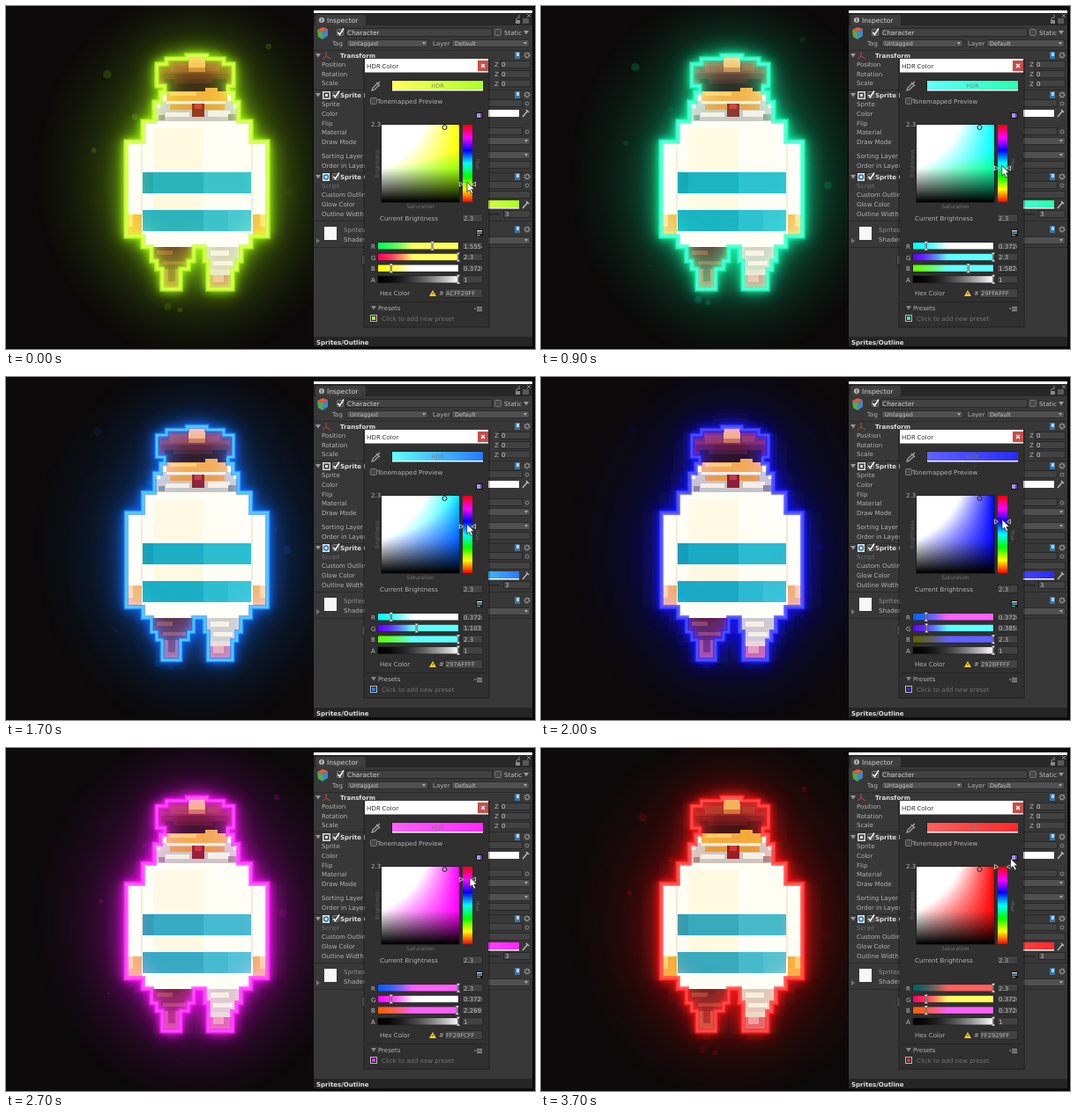
Write an HTML page with a canvas that moves like this. It is 600 px wide and 390 px high and loops after 3800 ms.

```html
<!DOCTYPE html>
<html lang="en">
<head>
<meta charset="utf-8">
<title>HDR outline color</title>
<style>
html, body { margin: 0; width: 100%; height: 100%; overflow: hidden; background: #0c0a0a; }
svg, canvas { position: absolute; display: block; }
svg { left: 0; top: 0; }
canvas { left: 426px; top: 135px; }
text { font-family: "DejaVu Sans", Verdana, sans-serif; white-space: pre; }
.title { font-family: "Open Sans", "Noto Sans", sans-serif; }
.glow { fill: var(--glow); }
.add { mix-blend-mode: screen; }
</style>
</head>
<body>
<svg id="stage" width="600" height="390" viewBox="0 0 600 390"></svg>
<canvas id="field" width="88" height="88"></canvas>
<script>
const LOOP = 3800, STEP = 100, MAX = 2.3, LOW = 0.162;
const stage = document.getElementById('stage');
const field = document.getElementById('field').getContext('2d');

// time, hue, pointer x, pointer y
const keys = [
  [0, 83.18, 523, 200], [500, 127.86, 523, 189], [1300, 187.46, 522.5, 174],
  [2000, 239.59, 523, 162], [2400, 274.33, 524.5, 153], [3100, 336.44, 528, 138.5],
  [3350, 360, 530, 133], [3700, 360, 532.5, 125.5]
];

const clamp = (v, a = 0, b = 1) => Math.min(b, Math.max(a, v));
const mix = (a, b, k) => a + (b - a) * k;
const mixRgb = (a, b, k) => a.map((v, i) => mix(v, b[i], k));
const css = c => `rgb(${c.map(v => Math.round(clamp(v) * 255)).join(', ')})`;
const pureHue = h => [0, 4, 2].map(o => clamp(Math.abs((h / 60 + o) % 6 - 3) - 1));
const range = (n, f) => Array.from({ length: n }, (_, i) => f(i));

// Markup helpers
const rect = (x, y, w, h, fill, extra = '') =>
  `<rect x="${x}" y="${y}" width="${w}" height="${h}" fill="${fill}" ${extra}/>`;
const path = (d, fill, extra = '') => `<path d="${d}" fill="${fill}" ${extra}/>`;
const text = (x, y, s, fill = '#b4b4b4', size = 7, extra = '') =>
  `<text x="${x}" y="${y}" fill="${fill}" font-size="${size}" ${extra}>${s}</text>`;
const bold = (x, y, s, fill = '#dedede') => text(x, y, s, fill, 7, 'font-weight="bold"');
const box = (x, y, w, h, fill = '#424242') =>
  rect(x + .5, y + .5, w - 1, h - 1, fill, 'stroke="#272727"');
const check = (x, y, on) => rect(x + .5, y + .5, 7, 7, '#474747', 'stroke="#777" rx="1"') +
  (on ? path(`M${x + 1.5} ${y + 4} l2 2.5 l4.5 -7`, 'none', 'stroke="#fff" stroke-width="1.4"') : '');
const down = (x, y, fill = '#999') => path(`M${x - 3} ${y - 2} h6 l-3 4.5 z`, fill);
const select = (x, y, w, s = '') =>
  rect(x + .5, y + .5, w - 1, 8, '#505050', 'stroke="#2b2b2b" rx="1.5"') +
  text(x + 4, y + 7, s, '#c4c4c4', 6.5) + path(`M${x + w - 7} ${y + 3} h4 l-2 3 z`, '#aaa');
const dot = (x, y) => `<circle cx="${x}" cy="${y}" r="2" fill="none" stroke="#888"/>`;
const dropper = (x, y) => path(`M${x - 3} ${y + 4} l5 -6 M${x + 1} ${y - 4} l3 3`, 'none',
  'stroke="#b5b5b5" stroke-width="1.5"');
const tools = y => rect(577, y - 4, 6, 8, '#3978a8') + rect(579, y - 3, 3, 4, '#b7d4e6') +
  `<circle cx="591" cy="${y}" r="2.5" fill="none" stroke="#999" stroke-width="2" stroke-dasharray="1.5 .6"/>`;
const rule = y => rect(349, y, 248, 1, '#2a2a2a');
const spread = (id, n) => `<linearGradient id="${id}">` +
  range(n, i => `<stop offset="${i / (n - 1)}"/>`).join('') + '</linearGradient>';

// Silhouette as steps: top, left, right
const torso = [[56, 205, 228], [60, 182, 247], [66, 171, 258], [91, 180, 252], [98, 175, 258],
  [109, 168, 264], [131, 155, 278], [154, 136, 297], [262, 155, 278]];
const leftLeg = [[274, 165, 213], [290, 171, 207], [299, 177, 198]];
const rightLeg = [[274, 225, 267], [290, 229, 262], [300, 229, 257]];
const side = (rows, col, end) => rows.flatMap((r, i) =>
  [[r[col], r[0]], [r[col], i + 1 < rows.length ? rows[i + 1][0] : end]]);
const loop = (rows, end, inner = []) =>
  [...side(rows, 2, end), ...inner, ...side(rows, 1, end).reverse()];
const outline = loop(torso, 274, [...loop(rightLeg, 322), ...loop(leftLeg, 322)]);
const body = 'M' + outline.map(p => p.join(' ')).join(' L ') + ' Z';

const block = (fill, ...boxes) => boxes.map(b => rect(...b, fill)).join('');

function head() {
  return block('#5d1b1b', [182, 60, 65, 38], [171, 66, 87, 25]) +
    block('#7c2620', [184, 64, 62, 8], [175, 72, 79, 5]) +
    block('#923426', [186, 66, 20, 9], [228, 67, 14, 7]) +
    block('#2b1213', [180, 83, 70, 15]) + block('#49191b', [190, 83, 44, 5]) +
    block('#f3ad57', [207, 58, 19, 17]) + block('#c77031', [207, 70, 19, 5]) +
    block('#f3a93a', [182, 97, 69, 11], [226, 93, 14, 6]) + block('#ffcb62', [186, 98, 30, 4]) +
    block('#c6c3bd', [175, 108, 83, 8], [168, 116, 96, 15]) +
    block('#f4eee3', [182, 108, 67, 3], [181, 121, 27, 5], [229, 119, 25, 7]) +
    block('#eb982e', [186, 112, 62, 6]) + block('#8b807c', [173, 124, 7, 6], [252, 123, 9, 7]) +
    block('#8c1c20', [211, 111, 14, 15]) + block('#c9332a', [214, 111, 8, 6]);
}

function shirt() {
  const stripe = y => block('#19a9bb', [155, y, 69, 24]) + block('#2ab9ca', [224, y, 54, 24]);
  return block('#fff9df', [167, 139, 57, 47], [167, 213, 57, 19]) +
    block('#f1e9d5', [153, 157, 2, 83], [278, 157, 2, 83]) + stripe(189) + stripe(232) +
    block('#159caf', [155, 189, 12, 24]) + block('#38c2d0', [252, 232, 26, 24]) +
    block('#f2ad3b', [138, 237, 16, 23], [280, 237, 15, 23]) +
    block('#ffd06d', [138, 237, 6, 14], [288, 237, 7, 14]);
}

function legs() {
  return block('#5c211f', [165, 274, 48, 16], [171, 290, 36, 9]) +
    block('#8c402f', [171, 278, 18, 5], [178, 290, 26, 4]) +
    block('#a14938', [178, 299, 19, 22]) + block('#6a2825', [184, 299, 8, 14]) +
    block('#cfc7b8', [225, 274, 42, 16], [229, 290, 33, 10]) +
    block('#f6eedb', [232, 278, 21, 6], [235, 290, 22, 5]) +
    block('#e5d5c4', [230, 300, 27, 21]) + block('#c4646a', [231, 306, 25, 15]) +
    block('#e49a94', [235, 306, 12, 8]);
}

const blur = (id, s) => `<filter id="${id}" filterUnits="userSpaceOnUse" x="0" y="0" width="349" height="388">
  <feGaussianBlur stdDeviation="${s}"/></filter>`;

function scene() {
  const shape = extra => `<path d="${body}" ${extra}/>`;
  const line = (color, width, extra = '') =>
    shape(`fill="none" stroke="var(--${color})" stroke-width="${width}" ${extra}`);
  return `<defs>${blur('near', 4)}${blur('mid', 11)}${blur('far', 32)}${blur('rim', 3)}
    <clipPath id="view"><rect width="348" height="388"/></clipPath>
    <clipPath id="inside">${shape('')}</clipPath>
    <radialGradient id="haze"><stop offset="0" stop-color="var(--glow)" stop-opacity=".25"/>
      <stop offset=".6" stop-color="var(--glow)" stop-opacity=".1"/>
      <stop offset="1" stop-color="var(--glow)" stop-opacity="0"/></radialGradient></defs>
  ${rect(0, 0, 600, 390, '#0c0a0a')}
  <g clip-path="url(#view)">
    <ellipse cx="216" cy="192" rx="185" ry="215" fill="url(#haze)"/>
    <g id="sparks"></g>
    ${shape('class="glow" filter="url(#far)" opacity=".5"')}
    ${shape('class="glow" filter="url(#mid)" opacity=".65" stroke="var(--glow)" stroke-width="6"')}
    ${shape('class="glow" filter="url(#near)" opacity=".9" stroke="var(--glow)" stroke-width="5"')}
    ${shape('fill="#fffef4"')}${head()}${shirt()}${legs()}
    <g class="add" clip-path="url(#inside)">
      ${shape('class="glow" opacity=".13"')}
      ${line('glow', 15, 'filter="url(#mid)" opacity=".6"')}
      ${line('glow', 6, 'filter="url(#rim)" opacity=".7"')}
    </g>
    ${line('glow', 6, 'opacity=".55"')}
    ${line('hot', 3)}
  </g>`;
}

function inspector() {
  const labels = [['Position', 69], ['Rotation', 79.5], ['Scale', 90], ['Sprite', 114], ['Color', 125],
    ['Flip', 135.5], ['Material', 146], ['Draw Mode', 157], ['Sorting Layer', 173], ['Order in Layer', 184],
    ['Custom Outline', 217], ['Glow Color', 228], ['Outline Width', 239]];
  return rect(349, 5, 248, 3.5, '#fff') + rect(349, 8, 248, 379, '#383838') +
    rect(349, 8, 248, 14, '#282828') + rect(351, 10, 57, 12, '#3d3d3d', 'rx="2"') +
    '<circle cx="358" cy="16" r="3" fill="#bbb"/>' + rect(357.5, 14, 1, 4, '#333') +
    text(364, 19, 'Inspector', '#d5d5d5', 7.6) +
    rect(578, 16, 5, 4, '#888') + path('M579 16 v-2 q1.5 -2 3 0', 'none', 'stroke="#888"') +
    path('M586 15 h7 M586 17 h7 M586 19 h7', 'none', 'stroke="#888"') +
    path('M582 10 v4 M591 9 l4 4 M595 9 l-4 4', 'none', 'stroke="#888"') +
    path('M353 27 l6 -3 l6 2 l-6 4 z', '#e05a3a') + path('M353 27 l6 3 v8 l-5 -3 z', '#4fae48') +
    path('M359 30 l6 -4 v8 l-6 4 z', '#3f89c8') +
    check(375, 26, true) + box(385, 25, 167, 10) + text(387, 32.5, 'Character', '#ccc', 7.4) +
    check(554, 26, false) + text(565, 33, 'Static', '#c4c4c4') + down(590, 30) +
    text(370, 45, 'Tag') + select(386, 38, 93, 'Untagged') + text(484, 45, 'Layer') + select(505, 38, 89, 'Default') +
    rule(50) + rule(95) + rule(189) + rule(244) +
    [56, 101, 194].map(y => down(354, y) + tools(y)).join('') + tools(254) +
    path('M363 52 v5 l5 3 M363 57 l-4 3', 'none', 'stroke="#b84a3b"') + bold(379, 59, 'Transform') +
    rect(359, 97, 9, 9, '#d9d9d9') + rect(360.5, 98.5, 6, 6, '#3b3b3b') + rect(362, 100, 3, 3, '#ddd') +
    check(370, 97, true) + bold(379, 104, 'Sprite Renderer') +
    rect(359, 190, 8, 9, '#d7e5ed') +
    '<circle cx="363" cy="194.5" r="2.5" fill="none" stroke="#2f75a8" stroke-width="1.5"/>' +
    check(370, 190, true) + bold(379, 197, 'Sprite Outline') +
    labels.map(([s, y]) => text(358, y, s)).join('') + text(358, 207, 'Script', '#707070') +
    [62, 73, 83.5].map(y => box(560, y, 35, 9) + text(554, y + 7, 'Z') + text(562, y + 7, '0', '#ccc')).join('') +
    [106, 138, 199].map(y => box(500, y, 86, 9) + dot(591, y + 5)).join('') +
    [149, 165].map(y => select(500, y, 95)).join('') + box(500, 176, 95, 9) + box(500, 210, 95, 9) +
    rect(500, 118, 82, 8, '#fff') + dropper(589, 122) +
    rect(500, 221, 82, 8, 'url(#swatch)') + rect(500, 229, 82, 1.5, '#fff') + dropper(589, 226) +
    rect(500, 236, 60, 1.5, '#262626') + box(564, 232, 31, 9) + text(566, 239, '3', '#ccc') +
    rect(361, 251, 14, 15, '#f7f7f7') + text(383, 257, 'Sprites/Outline', '#929292') + text(383, 268, 'Shader') +
    path('M352 264 v6 l4 -3 z', '#777') + select(500, 262, 95) + rule(274) +
    rect(403.5, 282.5, 139, 12, '#505050', 'stroke="#292929" rx="2"') +
    rect(349, 376, 248, 11, '#252525') + bold(352, 385, 'Sprites/Outline');
}

function sliders() {
  return ['R', 'G', 'B', 'A'].map((s, i) => {
    const y = 269 + i * 12.7;
    return text(414, y + 6.8, s, '#c0c0c0') + rect(421.5, y - .5, 92, 8.5, '#1c1c1c') +
      rect(422, y, 91, 7.5, `url(#bar${s})`) + box(517, y - 1, 24, 9.5) +
      `<g clip-path="url(#cells)">${text(519, y + 6.5, i > 2 ? '1' : '', '#c0c0c0', 7, `id="val${s}"`)}</g>` +
      path('M-2.5 -1.5 h5 L.6 1 v5.5 L2.5 9 h-5 L-.6 6.5 V1 z', '#eee',
        `id="knob${s}" stroke="#222" stroke-width=".6" transform="translate(513 ${y})"`);
  }).join('');
}

function popup() {
  const hues = range(7, i => `<stop offset="${i / 6}" stop-color="${css(pureHue(360 - i * 60))}"/>`).join('');
  return `<defs><linearGradient id="hues" x2="0" y2="1">${hues}</linearGradient>${spread('swatch', 2)}
    ${['R', 'G', 'B', 'A'].map(s => spread('bar' + s, 8)).join('')}
    <clipPath id="cells"><rect x="517" y="260" width="23" height="60"/></clipPath></defs>` +
    rect(405, 60, 144, 306, '#000', 'opacity=".25"') + rect(407, 60, 140, 304, '#303030') + rect(407, 60, 140, 15.5, '#fff') +
    text(409, 70.5, 'HDR Color', '#222', 7.5, 'class="title"') + rect(535, 62, 12, 12, '#c64e4b') +
    path('M539 66 l4 4 M543 66 l-4 4', 'none', 'stroke="#fff" stroke-width="1.2"') +
    path('M415 96 l1 -3 l5 -5 l2 2 l-5 5 z M420 87 l4 4 M422 88 l2 -2', 'none', 'stroke="#aaa" stroke-width="1.2"') +
    rect(437, 84, 104, 13, '#202020') + rect(438, 85, 103, 10, 'url(#swatch)') + rect(438, 95, 103, 1.5, '#fff') +
    text(489.5, 93, 'HDR', '#777', 6.5, 'text-anchor="middle" opacity=".85"') +
    check(413, 104, false) + text(421, 111, 'Tonemapped Preview') +
    rect(533, 121, 8, 7, '#131313') + rect(534, 122, 4, 5, '#a990eb') + rect(538, 122, 2, 5, '#6940af') +
    text(414, 137, '2.3') +
    text(0, 0, 'Brightness', '#626262', 6, 'transform="translate(423 179) rotate(-90)" text-anchor="middle"') +
    text(470, 230, 'Saturation', '#727272', 6, 'text-anchor="middle"') +
    text(0, 0, 'Hue', '#686868', 6, 'transform="translate(532.5 180) rotate(90)" text-anchor="middle"') +
    rect(425, 134, 90, 90, '#202020') + rect(518, 135, 11, 88, 'url(#hues)') +
    path('M514.5 -2.5 v5 l4 -2.5 z M532.5 -2.5 v5 l-4 -2.5 z', '#333', 'id="mark" stroke="#ddd" stroke-width=".8"') +
    text(424, 243.5, 'Current Brightness') + box(517, 236, 24, 10) + text(519, 243.5, '2.3') +
    rect(533, 254, 8, 8, '#151515') + rect(534, 255, 6, 1.5, '#d9d9d9') +
    rect(534, 257.5, 6, 1.5, '#58a6d8') + rect(534, 260, 4, 1.2, '#70b94d') +
    sliders() + text(424, 329, 'Hex Color') + path('M484 323 l4 7 h-8 z', '#f5cf22') + rect(483.6, 325.5, .8, 2.5, '#333') +
    text(491, 329, '#') + box(497, 321, 44, 11) + text(499, 329, '', '#b8b8b8', 6.7, 'id="hex"') +
    rect(409, 336, 136, 1, '#242424') + down(417, 343, '#888') + text(422, 346, 'Presets') +
    path('M531 344 h2 M534 342.5 h6 M534 344.5 h6 M534 346.5 h6', 'none', 'stroke="#aaa"') +
    rect(413.5, 351.5, 7, 7, '#222', 'stroke="#bbb"') + rect(415, 353, 4, 4, '#fff', 'id="chip"') +
    text(426, 358, 'Click to add new preset', '#737373') +
    path('M0 0 V11.5 L2.7 9 L4.8 13.5 L6.8 12.5 L4.8 8.3 H8.3 Z', '#fff', 'id="pointer" stroke="#222" stroke-width=".8"');
}

stage.innerHTML = scene() + inspector() + popup();
const el = id => document.getElementById(id);
const setStops = (id, colors) => [...el(id).children].forEach((s, i) => s.setAttribute('stop-color', colors[i]));
setStops('barA', range(8, i => css(Array(3).fill((i / 7) ** 1.7))));

function drawField(pure) {
  for (let y = 0; y < 88; y++) {
    const v = MAX * (1 - y / 87);
    const row = field.createLinearGradient(0, 0, 88, 0);
    for (let i = 0; i <= 16; i++) row.addColorStop(i / 16, css(pure.map(c => v * mix(1, c, i / 16))));
    field.fillStyle = row;
    field.fillRect(0, y, 88, 1);
  }
  field.strokeStyle = '#222';
  field.beginPath();
  field.arc(71.5, 3, 2.5, 0, Math.PI * 2);
  field.stroke();
}

const rand = n => { const v = Math.sin(n * 127.1) * 43758.5; return v - Math.floor(v); };

function drawSparks(t) {
  el('sparks').innerHTML = range(20, i => {
    const life = (t / LOOP + rand(i + 60)) % 1;
    const x = 40 + rand(i + 1) * 285 + 6 * Math.sin(life * Math.PI * 2);
    const y = 60 + rand(i + 20) * 310 - 35 * life;
    const alpha = 0.16 * Math.sin(life * Math.PI);
    return `<circle class="glow" cx="${x}" cy="${y}" r="${1.5 + rand(i + 40) * 4}" opacity="${alpha}"/>`;
  }).join('');
}

function pose(t) {
  const n = keys.findIndex(k => k[0] > t);
  if (n < 0) return keys[keys.length - 1].slice(1);
  const a = keys[n - 1], b = keys[n];
  const k = (t - a[0]) / (b[0] - a[0]);
  return mixRgb(a, b, k).slice(1);
}

function draw(t) {
  const [hue, px, py] = pose(t);
  const pure = pureHue(hue);
  const base = pure.map(v => mix(LOW, 1, v));
  const hdr = base.map(v => v * MAX);
  const bright = hdr.map(v => clamp(v));
  const flat = css(base);

  stage.style.setProperty('--glow', css(mixRgb(pure, base, 0.5)));
  stage.style.setProperty('--hot', css(mixRgb(base, bright, 0.6)));
  drawSparks(t);
  drawField(pure);
  setStops('swatch', [css(bright), flat]);

  ['R', 'G', 'B'].forEach((s, i) => {
    setStops('bar' + s, range(8, n => {
      const c = [...hdr];
      c[i] = clamp(n / 7 * MAX) ** 1.5;
      return css(c);
    }));
    el('val' + s).textContent = +hdr[i].toFixed(4);
    el('knob' + s).setAttribute('transform', `translate(${422 + 91 * base[i]} ${269 + i * 12.7})`);
  });

  const hex = base.map(v => Math.round(v * 255).toString(16).padStart(2, '0')).join('');
  el('hex').textContent = hex.toUpperCase() + 'FF';
  el('chip').setAttribute('fill', flat);
  el('mark').setAttribute('transform', `translate(0 ${223 - 88 * hue / 360})`);
  el('pointer').setAttribute('transform', `translate(${px} ${py})`);
}

const start = performance.now();
let shown = -1;
function tick() {
  const t = Math.floor(((performance.now() - start) % LOOP) / STEP) * STEP;
  if (t !== shown) draw(shown = t);
  requestAnimationFrame(tick);
}
tick();
</script>
</body>
</html>
```
